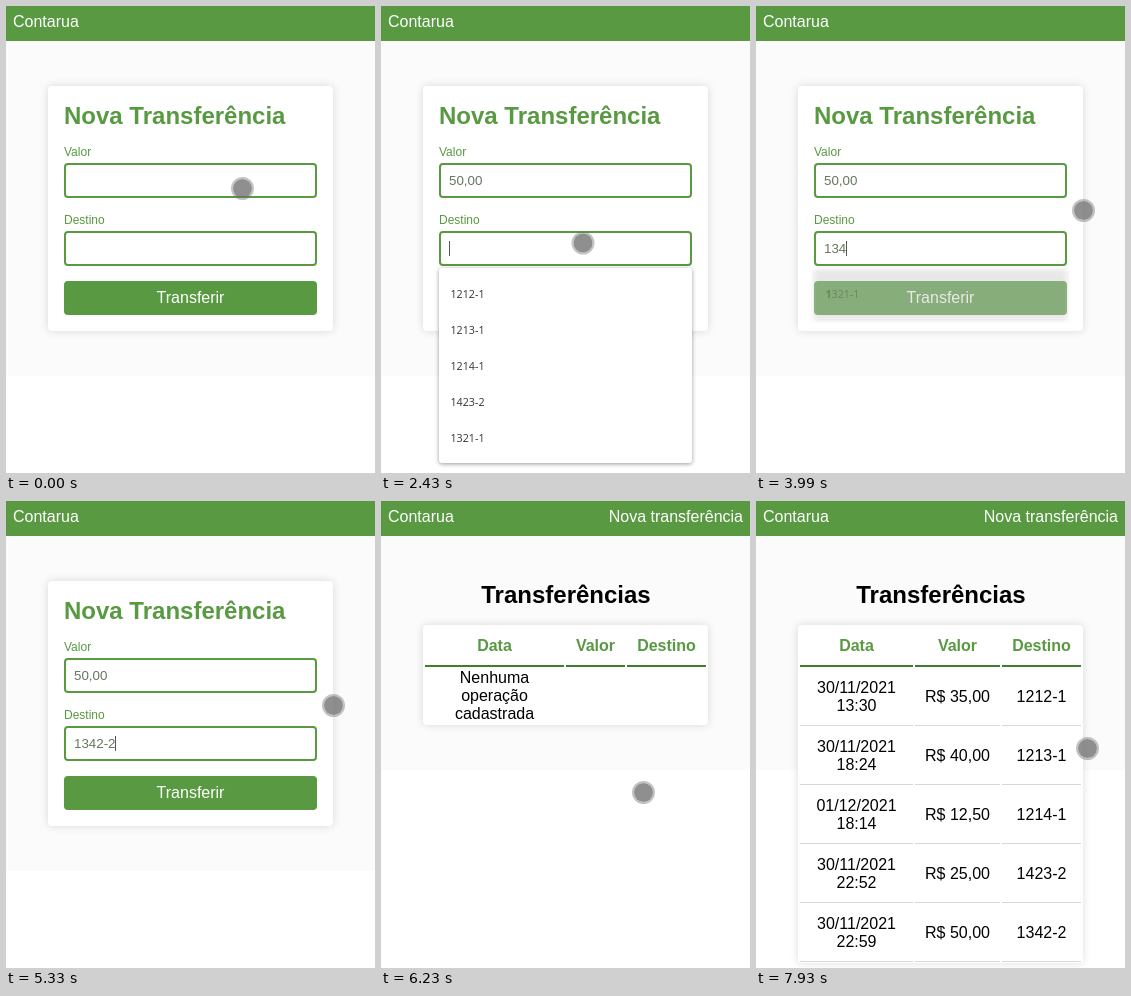
An HTML page with a canvas that plays this animation: 369 by 467 pixels, repeating every 8 s.

```html
<!DOCTYPE html>
<html lang="pt">
<head>
<meta charset="utf-8">
<title>Nova Transferência</title>
<style>
  html, body { margin: 0; width: 100%; height: 100%; overflow: hidden; background: #fff; }
  canvas { display: block; width: 369px; height: 467px; }
</style>
</head>
<body>
<canvas id="stage"></canvas>
<script>
const W = 369, H = 467, LOOP = 8000;
const GREEN = '#589942', DARK_GREEN = '#3f7f2b', INK = '#66775f';
const SANS = '"Liberation Sans", Arial, sans-serif';
const MENU_FONT = '"Open Sans", "Noto Sans", sans-serif';

const stage = document.getElementById('stage');
const scale = window.devicePixelRatio || 1;
stage.width = W * scale;
stage.height = H * scale;
const ctx = stage.getContext('2d', { alpha: false });
ctx.scale(scale, scale);

// Pointer stops: time, x, y
const path = [
  [1740, 236.5, 182.5], [2020, 202, 237], [2570, 202, 237], [2920, 334, 206],
  [3060, 327.5, 204.5], [5600, 327.5, 204.5], [6020, 262.5, 291.5],
  [6300, 262.5, 291.5], [6450, 262.5, 313], [6700, 251, 405],
  [6920, 338, 428], [7080, 302.5, 421.5], [7290, 264, 434],
  [7400, 262, 441], [7930, 331.5, 247.5]
];
const typing = {
  valor: ['50,00', [130, 540, 950, 1210, 1340]],
  destino: ['1342-2', [3060, 3390, 3850, 4330, 4860, 5330]]
};
const accounts = ['1212-1', '1213-1', '1214-1', '1423-2', '1321-1'];
const transfers = [
  ['30/11/2021', '13:30', 'R$ 35,00', '1212-1'],
  ['30/11/2021', '18:24', 'R$ 40,00', '1213-1'],
  ['01/12/2021', '18:14', 'R$ 12,50', '1214-1'],
  ['30/11/2021', '22:52', 'R$ 25,00', '1423-2'],
  ['30/11/2021', '22:59', 'R$ 50,00', '1342-2']
];

const between = (t, a, b) => t >= a && t < b;

function rect(x, y, w, h, color) {
  ctx.fillStyle = color;
  ctx.fillRect(x, y, w, h);
}

function panel(x, y, w, h, r, color, blur = 0, shadow = 'transparent', dy = 0) {
  ctx.save();
  ctx.shadowColor = shadow;
  ctx.shadowBlur = blur * scale;
  ctx.shadowOffsetY = dy * scale;
  ctx.fillStyle = color;
  ctx.beginPath();
  ctx.roundRect(x, y, w, h, r);
  ctx.fill();
  ctx.restore();
}

const card = (y, h) => panel(42, y, 285, h, 4, '#fff', 9, 'rgba(0,0,0,.14)');

function text(str, x, y, size, color, align = 'left', weight = 400, family = SANS) {
  ctx.font = `${weight} ${size}px ${family}`;
  ctx.textAlign = align;
  ctx.fillStyle = color;
  ctx.fillText(str, x, y);
  return ctx.measureText(str).width;
}

function typed([str, times], t) {
  return str.slice(0, times.filter(at => t >= at).length);
}

function field(label, y, value, focused) {
  text(label, 58, y - 7, 12, GREEN);
  ctx.strokeStyle = GREEN;
  ctx.lineWidth = 2;
  ctx.beginPath();
  ctx.roundRect(59, y + 1, 251, 33, 3);
  ctx.stroke();
  const w = text(value, 68, y + 22, 13.333, INK);
  if (focused) rect(Math.floor(68 + w), y + 10, 1, 15, '#555');
}

function menu(y, items, boldCount, alpha = 1) {
  ctx.globalAlpha = alpha;
  panel(58, y, 253, 16 + 36 * items.length - 1, 3, '#fff', 4, 'rgba(0,0,0,.4)', 1);
  items.forEach((item, i) => {
    const base = y + 29.5 + 36 * i;
    const w = text(item.slice(0, boldCount), 69.5, base, 10.7, '#333', 'left', 700, MENU_FONT);
    text(item.slice(boldCount), 69.5 + (boldCount ? w : 0), base, 10.7, '#333', 'left', 400, MENU_FONT);
  });
  ctx.globalAlpha = 1;
}

function formPage(t) {
  rect(0, 35, W, 335, '#fbfbfb');
  card(80, 245);
  text('Nova Transferência', 58, 118, 24, GREEN, 'left', 700);
  field('Valor', 157, typed(typing.valor, t), between(t, 130, 2090));
  field('Destino', 225, typed(typing.destino, t), t >= 2090);
  panel(58, 275, 253, 34, 4, GREEN);
  text('Transferir', 184.5, 297, 16, '#fff', 'center');

  if (between(t, 210, 610)) menu(194, ['5,00', '55,00'], 1);
  if (between(t, 2230, 3390)) menu(262, accounts, t < 3060 ? 0 : 1);
  if (between(t, 3390, 4060)) {
    menu(262, ['1321-1'], 1, Math.min(1, (4060 - t) / 210));
  }
}

function tablePage(loaded) {
  rect(0, 35, W, 234, '#fbfbfb');
  text('Nova transferência', 362, 21, 16, '#fff', 'right');
  text('Transferências', 185, 102, 24, '#000', 'center', 700);
  card(124, loaded ? 338 : 100);

  const split = loaded ? 157 : 183;
  const columns = [['Data', 44, split], ['Valor', split + 2, 244], ['Destino', 246, 325]];
  const centers = columns.map(([, a, b]) => (a + b) / 2);
  columns.forEach(([name, a, b], i) => {
    text(name, centers[i], 150, 16, GREEN, 'center', 700);
    rect(a, 164, b - a, 2, DARK_GREEN);
  });
  const cell = (str, col, y) => text(str, centers[col], y, 16, '#000', 'center');

  if (!loaded) {
    ['Nenhuma', 'operação', 'cadastrada'].forEach((s, i) => cell(s, 0, 182 + 18 * i));
    return;
  }
  transfers.forEach(([day, hour, value, account], i) => {
    const y = 59 * i;
    cell(day, 0, y + 192);
    cell(hour, 0, y + 210);
    cell(value, 1, y + 201);
    cell(account, 2, y + 201);
    columns.forEach(([, a, b]) => rect(a, y + 224, b - a, 1, '#d8d8d8'));
  });
}

function pointerAt(t) {
  const next = path.findIndex(p => p[0] > t);
  if (next === 0) return path[0].slice(1);
  if (next < 0) return path[path.length - 1].slice(1);
  const [t0, x0, y0] = path[next - 1], [t1, x1, y1] = path[next];
  const k = (t - t0) / (t1 - t0), e = k * k * (3 - 2 * k);
  return [x0 + (x1 - x0) * e, y0 + (y1 - y0) * e];
}

function pointer(x, y) {
  ctx.beginPath();
  ctx.arc(x, y, 9.5, 0, 7);
  ctx.fillStyle = 'rgba(112,112,112,.78)';
  ctx.fill();
  ctx.beginPath();
  ctx.arc(x, y, 10.5, 0, 7);
  ctx.strokeStyle = 'rgba(112,112,112,.42)';
  ctx.lineWidth = 2;
  ctx.stroke();
}

function draw() {
  const t = performance.now() % LOOP;
  rect(0, 0, W, H, '#fff');
  rect(0, 0, W, 35, GREEN);
  text('Contarua', 7, 21, 16, '#fff');
  if (t < 6160) formPage(t);
  else tablePage(t >= 6300);
  pointer(...pointerAt(t));
  requestAnimationFrame(draw);
}
draw();
</script>
</body>
</html>
```
